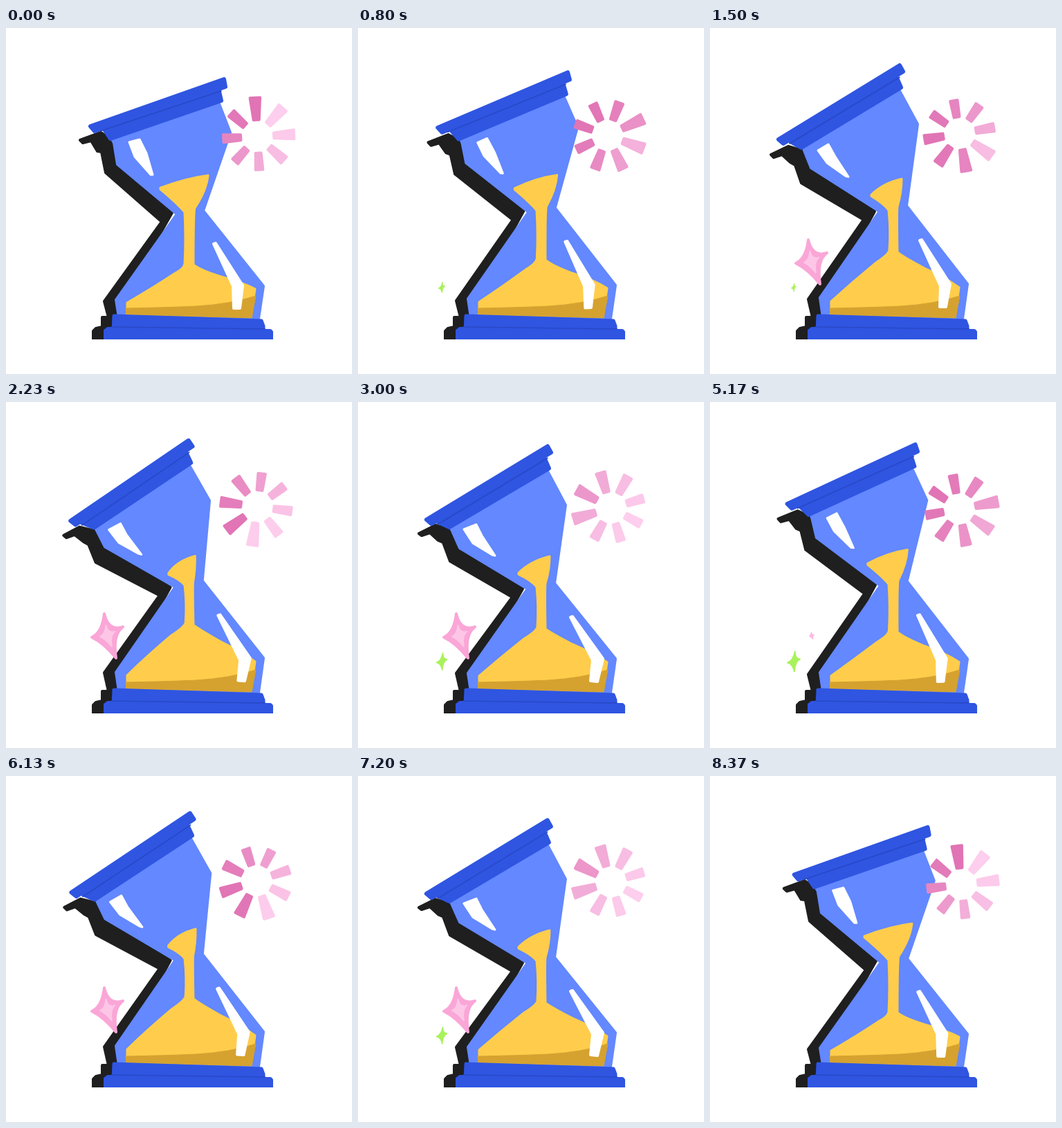
Write an HTML page that moves like this. It is 500 by 500 pixels and loops after 8410 ms.

```html
<!DOCTYPE html>
<html lang="en">
<head>
<meta charset="utf-8">
<title>Hourglass</title>
<style>
  html, body { margin: 0; width: 100%; height: 100%; overflow: hidden; background: #fff; }
  svg { display: block; width: 100vw; height: 100vh; }
</style>
</head>
<body>
<svg id="stage" viewBox="0 0 500 500"></svg>
<script>
const CYCLE = 4205;
const stage = document.getElementById('stage');

function add(tag, attrs, parent = stage) {
  const el = document.createElementNS('http://www.w3.org/2000/svg', tag);
  for (const key in attrs) el.setAttribute(key, attrs[key]);
  return parent.appendChild(el);
}

// Filled path whose corners are rounded by a stroke of the same colour.
function shape(d, color, round = 0, parent = stage) {
  return add('path', {
    d, fill: color, stroke: round ? color : 'none',
    'stroke-width': round, 'stroke-linejoin': 'round'
  }, parent);
}

// Parts that sway: each has an upright, a stretched and a sunken pose.
const swaying = [];
function sway(color, round, poses) {
  swaying.push({ el: shape(poses[0], color, round), poses });
}

const SHADOW = '#1f1f1f', FRAME = '#2f55e1', SEAM = '#2848c6';
const GLASS = '#6388ff', SAND = '#ffcd4b', SAND_DARK = '#d5a230';

sway(SHADOW, 4, [
  'M107 162L111 166L123 163L132 178L138 179L144 209L225 280L142 395L148 418L170 440L170 390L240 267L165 200L150 160L137 151Z',
  'M88 183L92 187L104 183L116 194L123 198L132 224L222 277L142 392L148 418L170 440L170 390L238 265L150 205L137 178L113 171Z',
  'M88 190L92 193L104 189L116 200L123 203L133 230L223 282L142 392L148 418L170 440L170 390L238 270L152 213L136 185L112 178Z'
]);
shape('M139 418L155 418L160 456L126 456L126 438L130 434L139 432Z', SHADOW, 4);

sway(GLASS, 4, [
  'M150 155L156 166L161 197L247 269L159 393L163 418L365 420L372 373L285 264L324 151L307 107Z',
  'M134 170L136 177L146 202L245 265L159 390L163 418L365 420L372 370L284 257L300 139L274 91Z',
  'M131 178L135 184L147 211L245 270L159 392L163 418L365 420L372 371L284 262L300 149L274 100Z'
]);

sway(SAND, 3, [
  'M223 231Q260 217 292 213Q290 234 273 260Q271 266 271 342Q281 350 310 359Q340 367 360 377L354 417L175 413L175 397Q213 375 243 355Q257 348 258 341Q260 305 258 266Q248 254 223 233Z',
  'M233 241Q250 224 277 218Q277 238 271 258Q270 266 271 324Q281 332 310 347Q340 360 360 375L354 417L175 413L175 395Q206 367 240 339Q258 327 259 321Q261 292 258 263Q251 254 233 243Z',
  'M232 247Q249 230 277 223Q277 243 271 262Q270 270 271 328Q281 335 310 350Q340 363 360 376L354 417L175 413L175 396Q206 369 240 342Q258 331 259 325Q261 296 258 267Q251 258 232 249Z'
]);
shape('M173 405Q230 404 275 402Q325 399 361 387L355 419L174 414Z', SAND_DARK, 1);

sway('#fff', 3, [
  'M178 165L193 161L203 181L212 212L209 212L186 186Z',
  'M156 177L171 168L181 186L200 215L196 214L169 195Z',
  'M153 184L171 177L179 193L198 222L194 221L166 204Z'
]);
sway('#fff', 4, [
  'M300 312L303 311L342 372L338 405L329 405L328 373Z',
  'M303 307L306 306L347 370L341 403L332 403L333 373Z',
  'M307 311L310 310L354 371L346 404L336 403L339 373Z'
]);

sway(FRAME, 6, [
  'M143 148L308 92L311 105L151 160Z',
  'M116 164L270 72L276 86L132 173Z',
  'M115 173L270 82L276 96L132 181Z'
]);
sway(FRAME, 6, [
  'M122 142L315 74L317 85L128 149Z',
  'M99 161L274 54L279 63L106 167Z',
  'M99 170L274 64L279 73L106 176Z'
]);
const seam = { fill: 'none', stroke: SEAM, 'stroke-width': 1.6, 'stroke-linecap': 'round' };
const seamPoses = ['M136 149L311 91', 'M115 167L274 71', 'M115 177L274 81'];
swaying.push({ el: add('path', { d: seamPoses[0], ...seam }), poses: seamPoses });

shape('M156 416L369 423L372 431L372 438L155 438Z', FRAME, 5);
shape('M143 437L147 434L382 437L384 439L384 456L143 456Z', FRAME, 4);
add('path', { d: 'M152 432L374 435', ...seam });
// The ground cuts the base off flat.
add('rect', { x: 0, y: 450, width: 500, height: 50, fill: '#fff' });

// Loader: eight hand-sized rays, all turning about one slightly off-axis centre.
const rays = [37, 36, 34, 32, 29, 29, 30, 31].map(len => {
  const outer = len * 0.25 - 2, inner = 4, near = -24, far = -19 - len;
  return shape(`M${-inner} ${near}L${-outer} ${far}L${outer} ${far}L${inner} ${near}Z`, '#fff', 4);
});
const mix = (a, b, k) => a.map((v, i) => Math.round(v + (b[i] - v) * k));
const PALE = [253, 206, 237], DEEP = [225, 116, 181];

const pinkStar = add('g', {});
const starPath = 'M-5 -32Q1 -6 22 -13Q7 -3 12 32Q-6 10 -23 2Q-8 -5 -5 -32Z';
shape(starPath, '#faa6d7', 4, pinkStar);
shape(starPath, '#fdc6e7', 4, pinkStar).setAttribute('transform', 'scale(.48)');
const greenStar = add('g', {});
shape('M2 -16Q2 -4 10 -4Q2 0 1 16Q-2 3 -10 2Q-1 -1 2 -16Z', '#a8f25b', 2, greenStar);

const ramp = (t, from, to) => {
  const k = Math.min(1, Math.max(0, (t - from) / (to - from)));
  return k * k * (3 - 2 * k);
};

// Weights placing the point at this angle among the poses at 0, 1500 and 3000 ms.
function poseWeights(angle) {
  const c = Math.cos(angle), s = Math.sin(angle);
  const sunken = (1 - c - 2.0769 * s) / 3.2472;
  const stretched = (s + 0.9749 * sunken) / 0.7818;
  const upright = 1 - sunken - stretched;
  const excess = upright < 0 ? upright * 0.38 : 0;
  return [upright - excess, stretched + excess / 2, sunken + excess / 2];
}

function blend(poses, weights) {
  const [, b, c] = poses.map(p => p.match(/\d+/g));
  let i = 0;
  return poses[0].replace(/\d+/g, n => {
    const v = n * weights[0] + b[i] * weights[1] + c[i] * weights[2];
    i++;
    return v.toFixed(2);
  });
}

function place(el, x, y, scale) {
  el.setAttribute('transform', `translate(${x} ${y}) scale(${scale})`);
  el.setAttribute('visibility', scale > 0.01 ? 'visible' : 'hidden');
}

function render(time) {
  const t = time % CYCLE;
  const angle = t / CYCLE * 2 * Math.PI;

  const weights = poseWeights(angle);
  for (const { el, poses } of swaying) el.setAttribute('d', blend(poses, weights));

  const turn = t / CYCLE * 360 - 3.5;
  rays.forEach((ray, i) => {
    const lag = (i || 8) - 8;
    const depth = 0.5 + 0.5 * Math.cos(angle + lag * Math.PI / 7);
    const color = `rgb(${mix(PALE, DEEP, depth)})`;
    ray.setAttribute('fill', color);
    ray.setAttribute('stroke', color);
    ray.setAttribute('transform',
      `translate(363 154) rotate(${turn}) translate(0 2.8) rotate(${i * 45})`);
  });

  place(pinkStar, 147, 338, ramp(t, 820, 1400) * (1 - ramp(t, 3050, 3850)));
  const beat = t % (CYCLE / 2);
  place(greenStar, 121, 375, ramp(beat, 550, 1060) * (1 - ramp(beat, 1060, 1810)));
}

const start = performance.now();
function tick() {
  render(performance.now() - start);
  requestAnimationFrame(tick);
}
tick();
</script>
</body>
</html>
```
